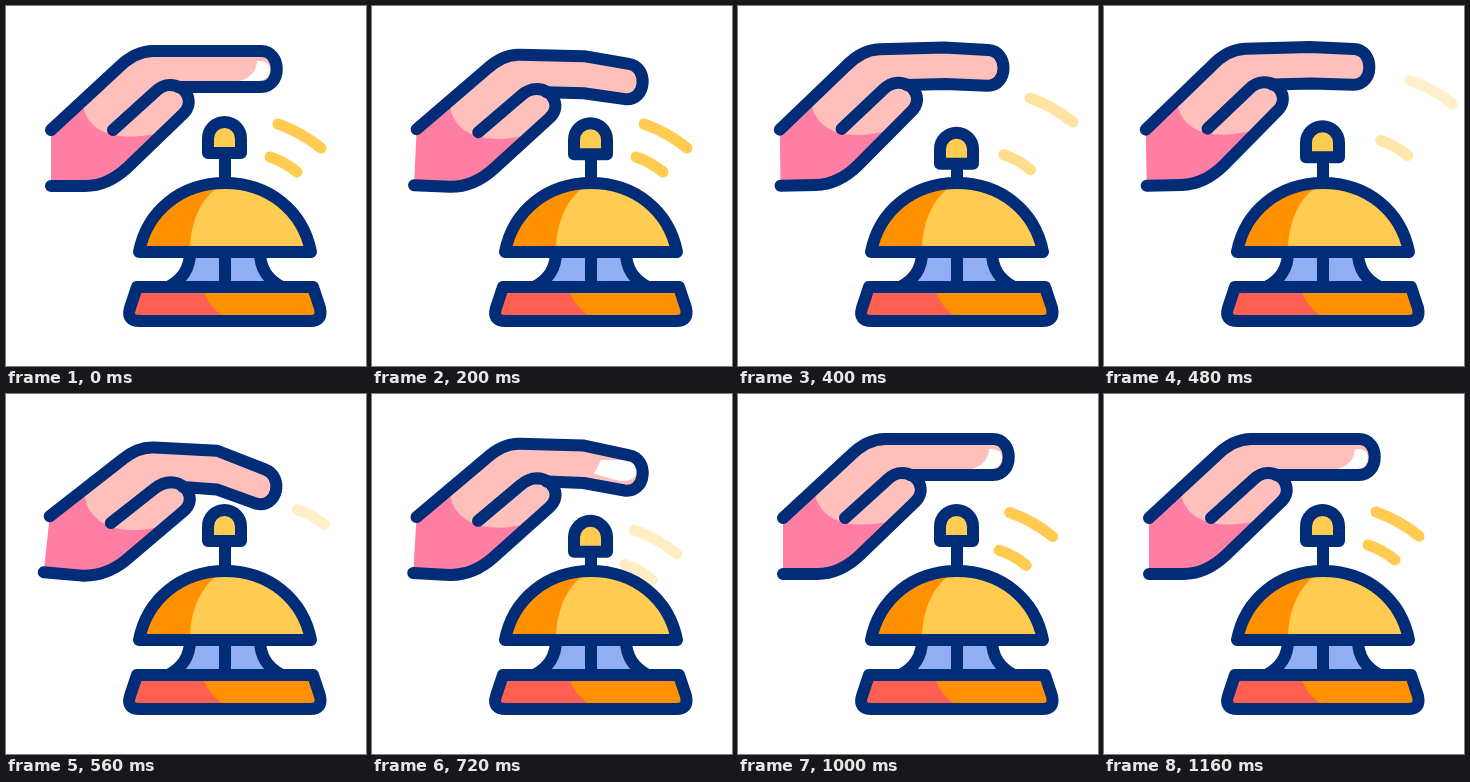
An HTML page with a canvas that plays this animation: 360 by 360 pixels, repeating every 1480 ms.

```html
<!DOCTYPE html>
<html lang="en">
<head>
<meta charset="utf-8">
<title>Service bell</title>
<style>
html, body { margin: 0; width: 100%; height: 100%; overflow: hidden; background: #fff; }
canvas { display: block; }
</style>
</head>
<body>
<canvas id="stage" width="360" height="360"></canvas>
<script>
const ctx = document.getElementById('stage').getContext('2d');
const LOOP = 1480, STEP = 40;
const NAVY = '#002c78', YELLOW = '#ffcb50', ORANGE = '#ff9000', BLUE = '#91aef2';
const RED = '#ff6052', PINK = '#ff7fa4', SKIN = '#ffbfba';

const clamp = x => Math.max(0, Math.min(1, x));
const ease = x => { x = clamp(x); return x * x * (3 - 2 * x); };

// Eased value at time t through [time, value] keys
function track(t, keys) {
  let value = keys[0][1];
  for (let i = 1; i < keys.length; i++) {
    const [t0, v0] = keys[i - 1], [t1, v1] = keys[i];
    if (t >= t0) value = v0 + (v1 - v0) * ease((t - t0) / (t1 - t0));
  }
  return value;
}

// Blend two path strings that share the same commands
function blend(a, b, k) {
  const to = b.match(/[\d.]+/g);
  let i = 0;
  return a.replace(/[\d.]+/g, n => +n + (to[i++] - n) * k);
}

function shape(d, fill, stroke, width = 12) {
  const path = new Path2D(d);
  if (fill) { ctx.fillStyle = fill; ctx.fill(path); }
  if (stroke) { ctx.strokeStyle = stroke; ctx.lineWidth = width; ctx.stroke(path); }
}

function group(draw) {
  ctx.save();
  draw();
  ctx.restore();
}

// Each part: relaxed pose, pressing pose
const HAND = {
  finger: ['M45,124 L112,62 Q129,45 147,45 L212,45 L255,45 C276,45 276,81 255,81 L212,81 L172,81',
           'M44,122 L118,66 Q133,54 149,55 L212,59 L260,80 C279,88 272,120 250,114 L211,98 L178,95'],
  thumb: ['M107,124 L149,86 Q156,79 164,79 ', 'M105,130 L148,97 Q157,90 166,90 '],
  palm: ['C181,79 189,97 177,108 L122,161 Q102,180 79,180 L45,180',
         'C183,91 191,109 178,119 L120,167 Q100,183 76,182 L37,178'],
  light: ['M77,100 C82,125 108,138 158,126 L300,100 L300,0 L77,0 Z',
          'M79,98 C80,128 110,146 158,133 L300,120 L300,0 L79,0 Z']
};

function drawHand(t) {
  const press = track(t, [[130, 0], [300, 1], [440, 0], [590, 1], [840, 0]]);
  const lift = track(t, [[300, 0], [440, 1], [590, 0]]);
  const pose = name => blend(...HAND[name], press);
  const finger = pose('finger'), thumb = pose('thumb'), palm = pose('palm');
  const outline = finger + thumb.replace(/.*Q\S+ /, 'L') + palm + 'Z';
  group(() => {
    ctx.translate(45 - 2.5 * lift, 150);
    ctx.rotate(-lift * 2.7 * Math.PI / 180);
    ctx.translate(-45, -150);
    shape(outline, PINK);
    group(() => {
      ctx.clip(new Path2D(outline));
      shape(pose('light'), SKIN);
      // fingertip shine
      if (t < 160 || t >= 800) shape('M251,55 Q264,54 264,64 Q263,75 250,75 L228,76 Q250,73 251,55 Z', '#fff');
      else if (t >= 680) shape('M229,66 L254,66 Q267,69 265,78 Q262,88 248,87 L222,80 Z', '#fff');
    });
    shape(finger, null, NAVY);
    shape(thumb + palm, null, NAVY);
  });
}

function drawBell(t) {
  const knob = track(t, [[160, 0], [360, 12], [560, 0], [700, 11.5], [840, 0]]);
  group(() => {
    ctx.translate(0, knob);
    shape('M219,148 V176', null, NAVY);
    shape('M202,147 V132.5 A16.5,16.5 0 0 1 235,132.5 V147 Z', YELLOW, NAVY);
  });
  const dome = 'M133,246 C141,205 175,177 219,177 ';
  shape('M184,246 Q184,270 162,281 H276 Q254,270 254,246 Z', BLUE);
  shape('M184,246 Q184,270 162,281 M254,246 Q254,270 276,281 M219,246 V281', null, NAVY);
  const full = dome + 'C263,177 297,205 305,246 Z';
  shape(full, YELLOW);
  shape(dome + 'C196,188 184,215 184,246 Z', ORANGE);
  shape(full, null, NAVY);

  const base = 'M131,281 H307 L314,302 Q317,315 304,315 H134 Q120,315 124,302 Z';
  shape(base, ORANGE);
  shape('M131,281 H196 Q202,303 225,315 H134 Q120,315 124,302 Z', RED);
  shape(base, null, NAVY);
}

// A dash flies off from `out`, then returns from below over `back`
function drawDash(t, d, out, back, duration) {
  const gone = ease((t - out) / 320);
  let x = 40 * gone, y = -52 * gone, alpha = clamp(1 - (t - 240) / (out + 100));
  if (t >= out + 320) {
    const rest = 1 - ease((t - back) / duration);
    x = -11 * rest;
    y = 20 * rest;
    alpha = clamp((t - 600) / 360);
  }
  group(() => {
    ctx.globalAlpha = alpha;
    ctx.translate(x, y);
    shape(d, null, YELLOW, 11);
  });
}

function frame(now) {
  const t = Math.floor(now / STEP) * STEP % LOOP;
  ctx.fillStyle = '#fff';
  ctx.fillRect(0, 0, 360, 360);
  ctx.lineCap = ctx.lineJoin = 'round';
  drawDash(t, 'M272,118 Q295,126 315,142', 240, 640, 400);
  drawDash(t, 'M264,151 Q279,156 291,166', 360, 680, 480);
  drawBell(t);
  drawHand(t);
}

const start = performance.now();
(function loop() {
  frame(performance.now() - start);
  requestAnimationFrame(loop);
})();
</script>
</body>
</html>
```
